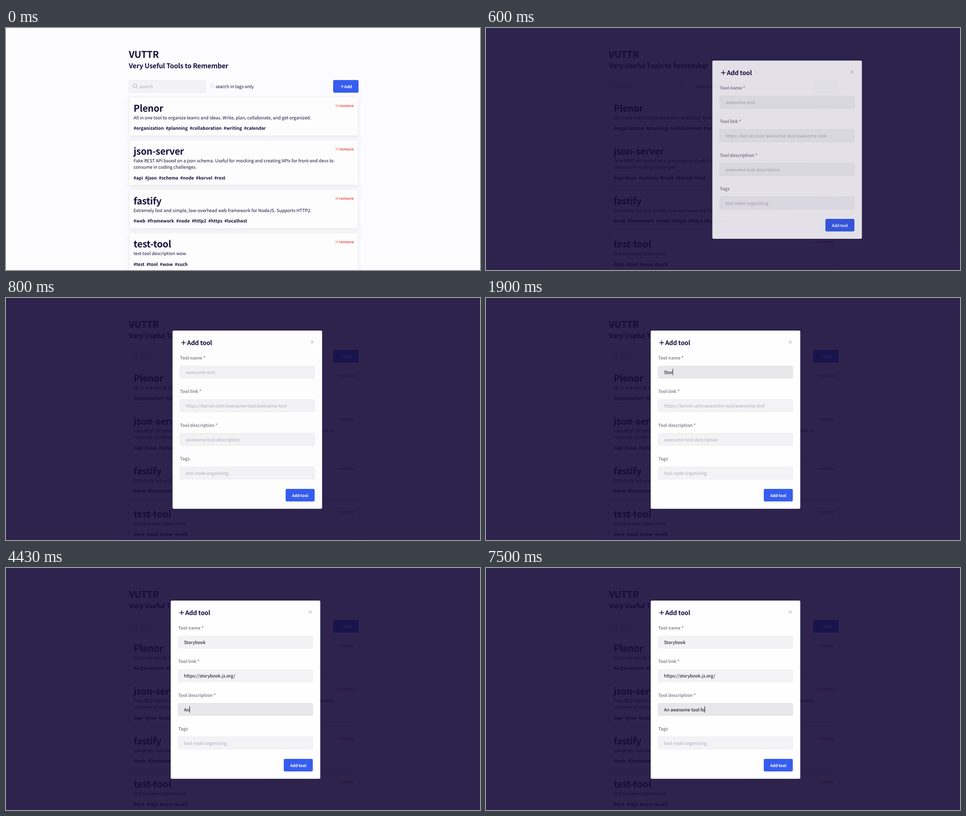
Animation, 1046 px wide and 535 px high, one loop 8000 ms. Source, as an HTML page:

```html
<!DOCTYPE html>
<html lang="en">
<head>
<meta charset="utf-8">
<title>VUTTR</title>
<style>
  html, body { margin: 0; width: 100%; height: 100%; overflow: hidden; background: #fcfcfe; }
  svg { display: block; }
  text {
    font: 9.8px "Noto Sans CJK JP", "Noto Sans CJK SC", "Noto Sans CJK", "Open Sans", sans-serif;
    fill: #170c3a; white-space: pre; text-rendering: geometricPrecision;
  }
  .semi { font-weight: 600; letter-spacing: -.012em; }
  .tags { font-weight: 700; word-spacing: .22em; }
  .title { font-size: 20.5px; }
  .subtitle { font-size: 14.7px; }
  .heading { font-size: 13.7px; }
  .small { font-size: 8.82px; }
  .red { fill: #f0605c; }
  .white { fill: #fefefe; }
  .label { fill: #8f8a9b; }
  .hint { fill: #b1adb9; }
  .typed { fill: #000; }
  .card { fill: #fdfdfd; stroke: #ebeaed; filter: drop-shadow(0 5px 5px rgba(23, 12, 58, .07)); }
  .input { fill: #f3f2f5; stroke: #ebeaed; }
  .focus { fill: #e8e7ea; stroke: #dedce1; }
  .button { fill: #365df0; }
  .icon { fill: none; stroke: #170c3a; }
</style>
</head>
<body>
<svg id="stage" width="1046" height="535" viewBox="0 0 1046 535"></svg>
<script>
const LOOP = 8000, BLINK = 600;

const cards = [
  { top: 152, name: 'Plenor', tags: '#organization #planning #collaboration #writing #calendar',
    lines: ['All in one tool to organize teams and ideas. Write, plan, collaborate, and get organized.'] },
  { top: 247.6, name: 'json-server', tags: '#api #json #schema #node #korvel #rest',
    lines: ['Fake REST API based on a json schema. Useful for mocking and creating APIs for front-end devs to',
            'consume in coding challenges.'] },
  { top: 357.2, name: 'fastify', tags: '#web #framework #node #http2 #https #localhost',
    lines: ['Extremely fast and simple, low-overhead web framework for NodeJS. Supports HTTP2.'] },
  { top: 452.8, name: 'test-tool', tags: '#test #tool #wow #such',
    lines: ['test-tool description wow'] },
];

// keys: the time each character appears; a single time pastes the whole value
const fields = [
  { label: 'Tool name *', hint: 'awesome-tool', value: 'Storybook', focus: 1200,
    keys: [1470, 1600, 1730, 1900, 2070, 2230, 2370, 2500, 2630] },
  { label: 'Tool link *', hint: 'https://korvel.com/awesome-tool/awesome-tool',
    value: 'https://storybook.js.org/', focus: 2770, keys: [3600] },
  { label: 'Tool description *', hint: 'awesome-tool description', value: 'An awesome tool fo', focus: 3870,
    keys: [4230, 4430, 4700, 4830, 5170, 5370, 5600, 5700, 5830, 5930, 6070, 6170,
           6500, 6670, 6900, 7070, 7370, 7500] },
  { label: 'Tags', hint: 'tool node organizing', value: '', focus: Infinity, keys: [] },
];

const text = (x, y, cls, str, extra = '') => `<text x="${x}" y="${y}" class="${cls}" ${extra}>${str}</text>`;
const rect = (x, y, w, h, cls, r = 2.5) =>
  `<rect x="${x}" y="${y}" width="${w}" height="${h}" rx="${r}" class="${cls}"/>`;
const plus = (x, y, r, style) =>
  `<path class="icon" style="${style}" d="M${x - r} ${y}h${2 * r}M${x} ${y - r}v${2 * r}"/>`;
const cross = (x, y, r, style) =>
  `<path class="icon" style="${style}" d="M${x - r} ${y - r}l${2 * r} ${2 * r}m0 ${-2 * r}l${-2 * r} ${2 * r}"/>`;

function cardMarkup({ top, name, lines, tags }) {
  const extra = (lines.length - 1) * 14;
  return rect(271.5, top, 506, 86 + extra, 'card', 2)
    + text(281.5, top + 32.6, 'semi title', name)
    + lines.map((line, i) => text(281.5, top + 49.6 + 14 * i, '', line)).join('')
    + text(281.5, top + 73.2 + extra, 'tags', tags)
    + cross(730, top + 19.8, 3, 'stroke:#f0605c')
    + text(735, top + 23, 'semi small red', 'remove');
}

function fieldMarkup({ label, hint }, i) {
  const y = 74.4 * i;
  return text(380, 136 + y, 'semi label', label)
    + `<g class="field">${rect(380, 150.3 + y, 297, 27, 'input')}${text(392.8, 167.8 + y, 'hint', hint)}</g>`;
}

const stage = document.getElementById('stage');
stage.innerHTML = `
  ${text(271, 66.3, 'semi title', 'VUTTR')}
  ${text(271, 88.6, 'semi subtitle', 'Very Useful Tools to Remember')}
  ${rect(271.5, 115.5, 169, 27, 'input')}
  <path class="icon" style="stroke:#a5a1ae" d="M288.3 128a4 4 0 1 0-8 0a4 4 0 1 0 8 0M287.2 130.9l3 3"/>
  ${text(294.5, 133, 'hint', 'search')}
  ${rect(451.5, 125, 8, 8, 'input', 1)}
  ${text(462.5, 133, '', 'search in tags only')}
  ${rect(722, 115, 56, 28, 'button', 3)}
  ${plus(742, 129.2, 3.7, 'stroke:#fefefe')}
  ${text(746.6, 132.6, 'semi small white', 'Add')}
  ${cards.map(cardMarkup).join('')}
  <rect id="shade" width="1046" height="535" fill="#170c3a"/>
  <g id="modal">
    ${rect(363.5, 72, 330, 394, 'white', 3)}
    ${plus(387.7, 98.8, 5, 'stroke-width:1.5')}
    ${text(395.5, 104, 'semi heading', 'Add tool')}
    ${cross(671.5, 97.5, 3, 'stroke:#8f8a9b')}
    ${fields.map(fieldMarkup).join('')}
    ${rect(613, 422, 64, 27.7, 'button', 3)}
    ${text(645, 439.7, 'semi small white', 'Add tool', 'text-anchor="middle"')}
    <rect id="caret" width="1" height="14"/>
  </g>`;

const shade = document.getElementById('shade');
const modal = document.getElementById('modal');
const caret = document.getElementById('caret');
const groups = [...document.querySelectorAll('.field')];

// Remaining distance of a critically damped spring
const spring = ms => {
  const s = Math.max(0, ms) * 0.0208;
  return (1 + s) * Math.exp(-s);
};

function draw(t) {
  const fade = Math.min(1, Math.max(0, (t - 30) / 370));
  shade.setAttribute('opacity', 0.9 * (1 - (1 - fade) ** 2));

  const rest = spring(t - 430);
  modal.setAttribute('opacity', 1 - rest);
  modal.setAttribute('transform', `translate(${1046 * rest} 0)`);

  const active = fields.findLastIndex(f => t >= f.focus);
  caret.style.display = 'none';
  fields.forEach((field, i) => {
    const [box, label] = groups[i].children;
    const pressed = field.keys.filter(k => t >= k);
    const count = field.keys.length === 1 && pressed.length ? field.value.length : pressed.length;
    box.setAttribute('class', i === active ? 'input focus' : 'input');
    label.setAttribute('class', count ? 'typed' : 'hint');
    label.textContent = count ? field.value.slice(0, count) : field.hint;

    const last = pressed.length ? pressed[pressed.length - 1] : field.focus;
    if (i === active && Math.floor((t - last) / BLINK) % 2 === 0) {
      caret.style.display = '';
      caret.setAttribute('x', 392.8 + (count ? label.getComputedTextLength() : 0));
      caret.setAttribute('y', 156.8 + 74.4 * i);
    }
  });
}

function tick() {
  draw(performance.now() % LOOP);
  requestAnimationFrame(tick);
}
tick();
</script>
</body>
</html>
```
